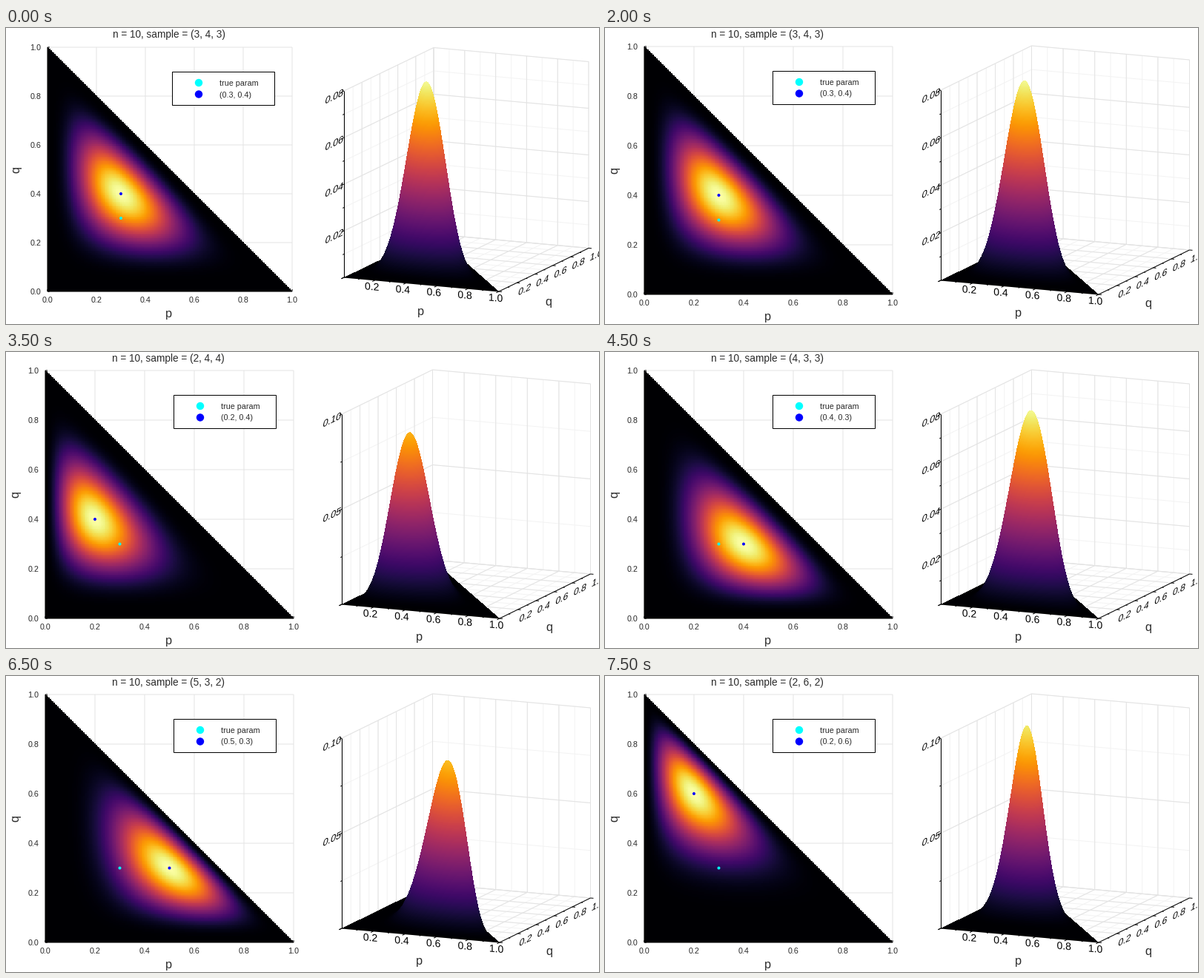
Write a matplotlib script that moves like this. It is 800x400 px and loops after 8 s.

```python
import math

import numpy as np
import matplotlib.pyplot as plt
from matplotlib.animation import FuncAnimation
from matplotlib.collections import LineCollection
from matplotlib.patches import Circle, PathPatch, Rectangle
from matplotlib.textpath import TextPath
from matplotlib.transforms import Affine2D

W, H = 800, 400
N = 200                 # grid cells per axis
PX = 0.72               # points per pixel at 100 dpi
FONT = "Liberation Sans"
INK = "#2b2b2b"
TRUE = (0.3, 0.3)
SAMPLES = [
    (3, 4, 3), (4, 2, 4), (2, 5, 3), (4, 3, 3),
    (3, 4, 3), (3, 4, 3), (5, 3, 2), (2, 4, 4),
    (4, 5, 1), (4, 3, 3), (5, 1, 4), (6, 1, 3),
    (4, 5, 1), (5, 3, 2), (1, 3, 6), (2, 6, 2),
]

# Panel geometry in pixels; the opening picture has slightly wider margins.
FIRST = dict(x0=56, x1=386, y0=356, y1=26, legend=(224, 59),
             title=220, guide=391, qx=18.5, plabel=(559, 388), qlabel=(732, 375.5),
             org=(456, 337), p=(209, 19), q=(121, -58.5), z=252)
REST = dict(x0=53, x1=388, y0=360, y1=25, legend=(226, 58),
            title=219, guide=394.5, qx=17.5, plabel=(557.5, 390), qlabel=(733, 377),
            org=(453, 341), p=(213, 19), q=(122.5, -60), z=257)

fig = plt.figure(figsize=(W / 100, H / 100), dpi=100, facecolor="white")
ax = fig.add_axes([0, 0, 1, 1])


def likelihood(sample, p, q):
    a, b, c = sample
    coef = math.factorial(a + b + c)
    for k in sample:
        coef //= math.factorial(k)
    return coef * p**a * q**b * np.maximum(1 - p - q, 0)**c


def lines(segments, color, zorder, **kw):
    ax.add_collection(LineCollection(segments, colors=color, linewidths=PX,
                                     zorder=zorder, **kw), autolim=False)


def label(x, y, s, size, ha="center", **kw):
    ax.text(x, y, s, fontsize=size * PX, family=FONT, color=INK, ha=ha,
            va="baseline", zorder=9, **kw)


def skewed(x, y, s, along, lean=0.0, size=14):
    """Text centred on (x, y), its baseline parallel to a projected axis."""
    path = TextPath((0, 0), s, size=size, prop={"family": FONT})
    box = path.get_extents()
    bx, by = np.array(along) / math.hypot(*along)
    move = Affine2D().translate(-(box.x0 + box.x1) / 2, -(box.y0 + box.y1) / 2)
    move += Affine2D.from_values(bx, by, lean, -1, x, y)
    ax.add_patch(PathPatch(move.transform_path(path), fc="black", lw=0, zorder=9))


def dot(x, y, r, color):
    ax.add_patch(Circle((x, y), r, fc=color, lw=0, zorder=8))


def draw_heatmap(g, sample):
    x0, x1, y0, y1 = g["x0"], g["x1"], g["y0"], g["y1"]

    def at(p, q):
        return x0 + (x1 - x0) * p, y0 + (y1 - y0) * q

    ticks = np.arange(6) / 5
    lines([[at(t, 0), at(t, 1)] for t in ticks]
          + [[at(0, t), at(1, t)] for t in ticks], "#e5e5e5", 1, snap=False)

    i = np.arange(N + 1)
    p, q = np.meshgrid(i / N, i / N)
    z = np.ma.masked_where(i[None, :] + i[:, None] > N, likelihood(sample, p, q))
    half = 0.5 / N
    left, bottom = at(-half, -half)
    right, top = at(1 + half, 1 + half)
    img = ax.imshow(z, cmap="inferno", vmin=0, vmax=z.max(), origin="lower",
                    extent=(left, right, bottom, top), aspect="auto",
                    interpolation="nearest", zorder=2)
    img.set_clip_path(Rectangle((x0, y1), x1 - x0, y0 - y1, transform=ax.transData))

    marks = [[(x0, y0), (x1, y0)], [(x0, y0), (x0, y1)]]
    for t in ticks:
        x, y = at(t, t)
        marks += [[(x, y0), (x, y0 - 3)], [(x0, y), (x0 + 3, y)]]
        label(x, y0 + 15, f"{t:.1f}", 10.8)
        label(x0 - 8.5, y + 4.3, f"{t:.1f}", 10.8, ha="right")
    lines(marks, "black", 3, snap=False)

    mle = sample[0] / 10, sample[1] / 10
    dot(*at(*mle), 2, "blue")
    dot(*at(*TRUE), 2, "cyan")

    label(g["title"], 13.3, f"n = 10, sample = {sample}", 13.6)
    label((x0 + x1) / 2 - 1.5, g["guide"], "p", 16.3)
    label(g["qx"], (y0 + y1) / 2, "q", 16.3, rotation=90, rotation_mode="anchor")

    lx, ly = g["legend"]
    ax.add_patch(Rectangle((lx, ly), 138, 45, fc="white", ec="black", lw=PX, zorder=7))
    for dy, color, s in ((15, "cyan", "true param"), (30.5, "blue", str(mle))):
        dot(lx + 36, ly + dy, 5.2, color)
        label(lx + 63.5, ly + dy + 4, s, 10.7, ha="left")


def draw_surface(g, sample):
    org, pv, qv = (np.array(g[k], float) for k in ("org", "p", "q"))

    def at(p, q, h=0.0):
        x = org[0] + pv[0] * p + qv[0] * q
        y = org[1] + pv[1] * p + qv[1] * q - g["z"] * h
        return np.stack([x, y], axis=-1)

    peak = likelihood(sample, sample[0] / 10, sample[1] / 10)
    unit = 0.02 if peak < 0.1 else 0.05
    top = math.ceil(peak / unit) * unit
    step = 0.02 if top < 0.09 else 0.05

    # Walls and floor: minor lines first, then major ones.
    for d, dz, color in ((0.1, step / 2, "#f3f3f3"), (0.2, step, "#e3e3e3")):
        segs = []
        for t in np.arange(0, 1.001, d):
            segs += [at(t, 0), at(t, 1)], [at(0, t), at(1, t)]
            segs += [at(0, t), at(0, t, 1)], [at(t, 1), at(t, 1, 1)]
        for h in np.arange(0, top + 1e-6, dz) / top:
            segs += [at(0, 0, h), at(0, 1, h)], [at(0, 1, h), at(1, 1, h)]
        lines(segs, color, 1, snap=False)

    # In each pixel column the surface is a curve over q; paint it back to front.
    width = int(pv[0])
    d = np.arange(width) + 0.5
    q_max = np.minimum(d / qv[0], (pv[0] - d) / (pv[0] - qv[0]))
    q = np.linspace(0, 1, N + 1)[:, None] * q_max
    p = (d - qv[0] * q) / pv[0]
    h = likelihood(sample, p, q) / top
    y = at(p, q, h)[..., 1]
    rows = np.arange(H)[:, None] + 0.5
    img = np.full((H, width), np.nan)
    with np.errstate(all="ignore"):
        for k in range(N - 1, -1, -1):
            t = (rows - y[k]) / (y[k + 1] - y[k])
            img = np.where((t >= 0) & (t <= 1), h[k] + t * (h[k + 1] - h[k]), img)
    ax.imshow(np.ma.masked_invalid(img), cmap="inferno", vmin=0, vmax=1,
              extent=(org[0], org[0] + width, H, 0), aspect="auto",
              interpolation="nearest", zorder=3)

    marks = [[at(0, 0), at(1, 0)], [at(1, 0), at(1, 1)], [at(0, 0), at(0, 0, 1)]]
    out_p, out_q = -qv / np.hypot(*qv), pv / np.hypot(*pv)
    for k in range(11):
        size = 2 if k % 2 else 4
        a, b = at(k / 10, 0), at(1, k / 10)
        marks += [a, a + size * out_p], [b, b + size * out_q]
        if k and k % 2 == 0:
            s = f"{k / 10:.1f}"
            skewed(a[0] - 4.2, a[1] + 8.5, s, pv)
            skewed(b[0] + 10.5, b[1] + 8.8, s, qv, lean=0.2, size=13.5)
    for k in range(round(2 * top / step) + 1):
        c = at(0, 0, k * step / 2 / top)
        marks.append([c, c + (2 if k % 2 else 4) * out_p])
        if k and k % 2 == 0:
            skewed(c[0] - 13, c[1] + 7.3, f"{k * step / 2:.2f}", qv, lean=0.2)
    lines(marks, "black", 4)

    label(*g["plabel"], "p", 16.3)
    label(*g["qlabel"], "q", 16.3)


def draw(k):
    ax.clear()
    ax.axis("off")
    g = FIRST if k == 0 else REST
    draw_heatmap(g, SAMPLES[k])
    draw_surface(g, SAMPLES[k])
    ax.set_xlim(0, W)
    ax.set_ylim(H, 0)
    return []


anim = FuncAnimation(fig, draw, frames=len(SAMPLES), init_func=lambda: [],
                     interval=500, repeat=True, repeat_delay=0)
plt.show()
```
